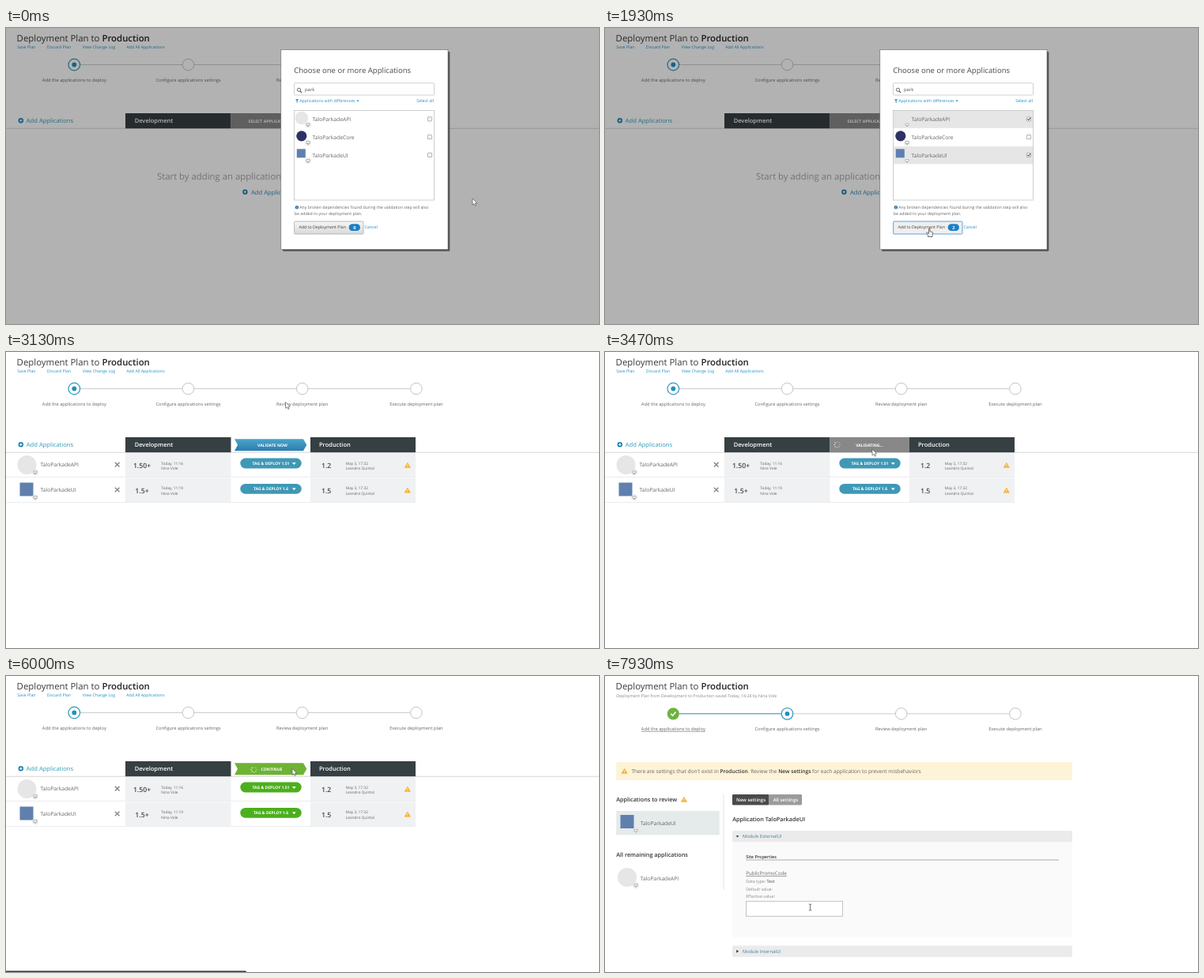
These frames come from a looping animation (750x375 px, 8000 ms). An HTML page:

```html
<!DOCTYPE html>
<html lang="en">
<head>
<meta charset="utf-8">
<title>Deployment plan</title>
<style>
  html, body { margin: 0; width: 100%; height: 100%; overflow: hidden; background: #fff; }
  svg { display: block; width: 100%; height: 100%; }
  text { font-family: "Open Sans", sans-serif; text-rendering: geometricPrecision; white-space: pre; }
</style>
</head>
<body>
<svg id="stage" viewBox="0 0 750 375"></svg>
<script>
const LOOP = 8000, FPS = 15;
const APP = 'TaloParkade';
const USER = 'Nina Vole', OTHER = 'Leandro Quintal';
const LINK = '#2390c8', TEAL = '#2f9ab8', GREY = '#666', DARK = '#363f42';

// drawing helpers
const text = (x, y, size, str, fill = GREY, weight = 400, anchor = 'start', extra = '') =>
  `<text x="${x}" y="${y}" font-size="${size}" fill="${fill}" font-weight="${weight}" text-anchor="${anchor}" ${extra}>${str}</text>`;
const rect = (x, y, w, h, fill, extra = '') =>
  `<rect x="${x}" y="${y}" width="${w}" height="${h}" fill="${fill}" ${extra}/>`;
const disc = (x, y, r, fill, extra = '') =>
  `<circle cx="${x}" cy="${y}" r="${r}" fill="${fill}" ${extra}/>`;
const path = (d, fill, extra = '') => `<path d="${d}" fill="${fill}" ${extra}/>`;
const stroke = (d, color, width = 1, extra = '') =>
  path(d, 'none', `stroke="${color}" stroke-width="${width}" ${extra}`);
const group = (id, body, extra = '') => `<g id="${id}" ${extra}>${body}</g>`;

const plus = (x, y) => disc(x, y, 3.2, '#1a7fb5') +
  stroke(`M${x - 1.8} ${y}h3.6M${x} ${y - 1.8}v3.6`, '#fff', 1.1);
const warning = (x, y) =>
  path(`M${x} ${y - 3.2}L${x + 3.6} ${y + 3}H${x - 3.6}Z`, '#f6b230', 'stroke="#f6b230" stroke-width=".6" stroke-linejoin="round"') +
  stroke(`M${x} ${y - 1.2}v2.2M${x} ${y + 1.5}v.8`, '#fff', .8);
const screenBadge = (x, y) => disc(x, y, 3.6, '#fff', 'stroke="#ccc" stroke-width=".5"') +
  stroke(`M${x - 2} ${y - 1.6}h4v2.7h-4zM${x - 1} ${y + 2}h2`, '#777', .6);
const caret = (x, y, fill, s = 2.2) => path(`M${x - s} ${y - s / 2}h${2 * s}l${-s} ${s * 1.2}z`, fill);
const apiIcon = (x, y, r) => disc(x, y, r, '#e6e6e6');
const uiIcon = (x, y, s) => rect(x - s / 2, y - s / 2, s, s, '#5f7fae');

const STEPS = ['Add the applications to deploy', 'Configure applications settings',
  'Review deployment plan', 'Execute deployment plan'];
const stepX = i => 86.3 + i * 144.2;

function stepper(y, active) {
  let out = stroke(`M86 ${y}H519`, '#c4c8ca', .9);
  if (active) out += stroke(`M86 ${y}H230`, TEAL, .9);
  STEPS.forEach((label, i) => {
    const x = stepX(i);
    if (i < active) {
      out += disc(x, y, 7.6, '#6db33f') + stroke(`M${x - 3} ${y}l2.2 2.4 4-4.6`, '#fff', 1.6);
    } else {
      const on = i === active;
      out += disc(x, y, 7.3, '#fff', `stroke="${on ? TEAL : '#bfc4c6'}" stroke-width="${on ? 1.2 : 1}"`);
      if (on) out += disc(x, y, 2.9, '#1f8fbf');
    }
    out += text(x, y + 21.1, 5.74, label, GREY, 400, 'middle',
      i < active ? 'text-decoration="underline"' : '');
  });
  return out;
}

const title = text(13.6, 16.8, 11.4,
  'Deployment Plan to <tspan font-weight="600" fill="#222">Production</tspan>', '#3a3a3a');

function planPage() {
  const links = [[14.2, 'Save Plan'], [51.8, 'Discard Plan'], [96.8, 'View Change Log'], [152.3, 'Add All Applications']];
  return title + links.map(([x, s]) => text(x, 25.5, 5.25, s, LINK)).join('') +
    stepper(46.5, 0) + plus(18.8, 117.2) + text(25.8, 120, 7.6, 'Add Applications', TEAL) +
    rect(0, 126.8, 750, .8, '#ccc') + rect(151, 108, 133.5, 19.2, DARK) +
    text(162.7, 119.8, 7.5, 'Development', '#fff', 600);
}

const emptyPlan = () =>
  rect(284.5, 108, 100.5, 19.2, '#888') +
  text(306.6, 120, 5.15, 'SELECT APPLICATIONS', '#fff', 700) +
  text(191, 192, 11.35, 'Start by adding an application to your plan', '#a3a3a3') +
  plus(302.4, 207.8) + text(310, 210.6, 7.65, 'Add Applications', '#2b86ad');

function planRow(y, icon, name, from, at, to) {
  return rect(151, y - 15, 133.5, 30.5, '#f0f1f2') + rect(385, y - 15, 133, 30.5, '#f0f1f2') +
    rect(0, y + 15.5, 518, .6, '#dfe1e2') + icon + screenBadge(37, y + 9.7) +
    text(43.6, y + 2.2, 6.7, name) +
    stroke(`M137.9 ${y - 2.9}l5.6 5.6m0-5.6l-5.6 5.6`, '#8f8f8f', 1.6) +
    text(172, y + 4.2, 8.7, from, '#414b50', 600, 'middle') +
    text(196.3, y - .3, 4.8, 'Today, ' + at) + text(196.3, y + 5.9, 4.8, USER) +
    text(399, y + 4.2, 8.7, to, '#414b50', 600) +
    text(429.8, y - .3, 4.8, 'May 3, 17:32') + text(429.8, y + 5.9, 4.8, OTHER) +
    warning(507.8, y + .6);
}

const pill = (y, label) => rect(296.3, y - 6.4, 77.4, 12.8, 'currentColor', 'rx="6.4"') +
  text(335, y + 1.9, 5.05, label, '#fff', 700, 'middle') + caret(364.3, y + .2, '#fff', 2.4);

const CHEVRON = 'M289 110.3H376L380.3 117.8 376 125.3H289L293 117.8Z';
const spinner = (x, y, r) => {
  let out = '';
  for (let i = 0; i < 8; i++)
    out += `<rect x="${-.6}" y="${-r}" width="1.2" height="1.5" rx=".4" fill="#fff" opacity="${.3 + i * .1}" transform="rotate(${i * 45})"/>`;
  return `<g transform="translate(${x} ${y})"><g class="spin">${out}</g></g>`;
};

function filledPlan() {
  return rect(385, 108, 133, 19.2, DARK) + text(396, 119.8, 7.5, 'Production', '#fff', 600) +
    planRow(142.8, apiIcon(26.5, 143, 12), APP + 'API', '1.50+', '11:16', '1.2') +
    planRow(174.6, uiIcon(26, 174, 17), APP + 'UI', '1.5+', '11:19', '1.5') +
    group('pills', pill(141, 'TAG &amp; DEPLOY 1.51') + pill(173.3, 'TAG &amp; DEPLOY 1.6')) +
    group('validate', path(CHEVRON, 'url(#blue)') + text(337, 120, 5.05, 'VALIDATE NOW', '#fff', 700, 'middle')) +
    group('validating', rect(284.5, 108, 100.5, 19.2, '#888') + spinner(293.6, 117.5, 4.2) +
      text(317.2, 120, 5.05, 'VALIDATING...', '#fff', 700)) +
    group('continue', path(CHEVRON, '#74ba3c', 'id="goShape"') +
      text(336, 120, 5.1, 'CONTINUE', '#fff', 700, 'middle') + group('goSpin', spinner(313.5, 118.7, 4)));
}

const checkbox = (y, id) => rect(533.4, y - 2.7, 5.2, 5.2, '#f4f4f4', 'rx=".6" stroke="#999" stroke-width=".7"') +
  group(id, stroke(`M534.4 ${y - .2}l1.3 1.4 2.4-3`, '#222', 1));

function dialog() {
  const row = (y, icon, name, id) => rect(365, y - 11, 176, 22.4, '#e6e6e6', `id="${id}Row"`) + icon +
    screenBadge(382, y + 7.2) + text(387.6, y + 2.9, 6.72, name) + checkbox(y, id + 'Check');
  return rect(0, 0, 750, 375, '#000', 'opacity=".3"') +
    rect(350, 30, 211.3, 252.8, '#333', 'opacity=".75" rx="1"') + rect(347.8, 27.5, 211.2, 253, '#fff', 'stroke="#666" stroke-width=".6"') +
    text(364.2, 57.3, 9.55, 'Choose one or more Applications', '#4a4a4a') +
    rect(364.5, 69.8, 177, 15.2, '#fff', 'rx="1" stroke="#c6c6c6" stroke-width=".8"') +
    disc(370.5, 78.3, 2.1, 'none', 'stroke="#555" stroke-width=".9"') + stroke('M372 79.9l2.2 2.2', '#555', 1.2) +
    text(378, 80.3, 5.9, 'park', '#555') +
    path('M366 90.2h4.2l-1.6 2v2.8l-1-.8v-2z', LINK) + text(371.3, 94.2, 5.25, 'Applications with differences', LINK) +
    caret(445, 92.3, LINK, 1.7) + text(541, 94.2, 5.35, 'Select all', LINK, 400, 'end') +
    row(115.4, apiIcon(373.8, 114, 8.2), APP + 'API', 'api') +
    row(138.2, disc(373.8, 136.8, 6.6, '#2d3263'), APP + 'Core', 'core') +
    row(161, uiIcon(373.3, 158.8, 11), APP + 'UI', 'ui') +
    rect(364.5, 104.5, 177, 113.5, 'none', 'stroke="#c2c2c2" stroke-width=".8"') +
    disc(367.9, 227.3, 2.2, '#2b6f9e') + stroke('M367.9 225.8v.7M367.9 227.1v1.6', '#fff', .8) +
    text(371.3, 229.2, 5.23, 'Any broken dependencies found during the validation step will also') +
    text(364.8, 237.4, 5.23, 'be added to your deployment plan.') +
    rect(364.6, 245, 87.4, 16, 'url(#button)', 'id="addButton" rx="1.2" stroke="#aaa" stroke-width=".8"') +
    text(370.4, 254.4, 5.28, 'Add to Deployment Plan', '#444') +
    rect(433.7, 248.3, 14.2, 8.8, '#1a80c4', 'rx="4.2"') +
    text(440.8, 254.7, 5.6, '0', '#fff', 700, 'middle', 'id="count"') +
    text(453.4, 254.4, 5.35, 'Cancel', LINK);
}

function settingsPage() {
  const bold = s => `<tspan font-weight="600" fill="#333">${s}</tspan>`;
  return title +
    text(14.2, 27.2, 5.25, `Deployment Plan from Development to Production saved Today, 14:28 by ${USER}`, '#888') +
    stepper(47.8, 1) +
    rect(14.2, 109, 576.8, 23, '#fdf3d7') + warning(24.6, 120.5) +
    text(33.4, 122.8, 6.63, `There are settings that don't exist in ${bold('Production')}. Review the ${bold('New settings')} for each application to prevent misbehaviors`) +
    text(14.2, 159, 7.25, 'Applications to review', '#333', 600) + warning(100, 156.4) +
    rect(14.2, 171, 130.6, 30.4, '#e5eaeb') + uiIcon(28, 184.5, 17) + screenBadge(39, 196) + text(44.8, 188.8, 6.7, APP + 'UI') +
    text(14.2, 228.6, 7.25, 'All remaining applications', '#333', 600) +
    apiIcon(28, 255, 12) + screenBadge(39, 265.2) + text(44.8, 258.6, 6.7, APP + 'API') +
    rect(149.6, 150, .8, 121, '#ddd') +
    rect(161, 150, 46.5, 13.5, '#4a4a4a', 'rx="1.2"') + rect(207.5, 150, 41.5, 13.5, '#9b9b9b', 'rx="1.2"') +
    text(184.6, 158.8, 5.95, 'New settings', '#fff', 600, 'middle') + text(228.4, 158.8, 5.95, 'All settings', '#fff', 600, 'middle') +
    text(161.2, 184, 7.25, `Application ${APP}UI`, '#333', 600) +
    rect(161, 203, 430, 128, '#fafafa') + rect(161, 196, 430, 14.3, '#ebebeb', 'rx="2"') +
    caret(167.5, 203.2, '#333', 2) + text(174, 205.3, 5.72, 'Module ExternalUI', '#417f9c') +
    text(178.2, 231, 5.48, 'Site Properties', '#333', 600) + rect(178.2, 232.6, 396, .8, '#999') +
    text(178.2, 252.2, 6.18, 'PublicPromoCode', GREY, 400, 'start', 'text-decoration="underline"') +
    ['Data type: <tspan fill="#444">Text</tspan>', 'Default value:', 'Effective value:']
      .map((s, i) => text(178.2, 262 + i * 9.6, 5.28, s, '#888')).join('') +
    rect(178.4, 285.3, 122, 19, '#fff', 'stroke="#b5b5b5" stroke-width=".8"') +
    rect(161, 341.6, 430, 14.3, '#ebebeb', 'rx="2"') + path('M166.2 346.9l3 1.9-3 1.9z', '#333') +
    text(174, 350.9, 5.72, 'Module InternalUI', '#417f9c');
}

const cursors =
  group('arrow', path('M0 0V8L1.9 6.4 3.2 9.2 4.5 8.6 3.3 5.9H5.8Z', '#fff', 'stroke="#444" stroke-width=".6"')) +
  group('hand', path('M0 .8C0-.2 1.5-.2 1.5.8V4.4L4.4 5Q5.2 5.2 5.1 6.2L4.5 9V11H-.8V9.4L-2.7 6.3C-3 5.4-2 5-1.4 5.8L0 7.2Z', '#fff', 'stroke="#333" stroke-width=".7"')) +
  group('beam', stroke('M-1.7-4Q0-4 0-3Q0-4 1.7-4M0-3V3M-1.7 4Q0 4 0 3Q0 4 1.7 4', '#555', .8));

const stage = document.getElementById('stage');
stage.innerHTML = `<defs>
  <linearGradient id="blue" x2="0" y2="1"><stop stop-color="#4aa5c9"/><stop offset="1" stop-color="#2b7cae"/></linearGradient>
  <linearGradient id="button" x2="0" y2="1"><stop stop-color="#f6f6f6"/><stop offset="1" stop-color="#dadada"/></linearGradient>
  </defs>` +
  group('plan', planPage()) + group('empty', emptyPlan()) + group('filled', filledPlan()) +
  group('dialog', dialog()) + group('settings', settingsPage()) +
  path('M0 375V373.6H302.5Q304 373.6 304 375Z', '#3a3a3a', 'id="bar"') + group('cursor', cursors);

const el = {};
stage.querySelectorAll('[id]').forEach(n => el[n.id] = n);
const spins = stage.querySelectorAll('.spin');
const show = (id, on) => el[id].style.display = on ? '' : 'none';

// pointer stops: time, x, y
const ROUTE = [
  [0, 590, 216], [130, 513, 151], [200, 513, 151], [530, 534, 115], [800, 534, 115],
  [1070, 534, 160], [1330, 534, 160], [1870, 409.5, 253.5], [2670, 409.5, 253.5],
  [3070, 356, 54], [3330, 338, 123], [4000, 338, 123], [4330, 362, 117.3],
  [7400, 362, 117.3], [7860, 259.5, 293], [LOOP, 259.5, 293]
];
const SPINS = [3600, 3670, 5270, 5400, 5600, 5730, 5870, 6000, 6200, 6330, 6470, 6600];

function pointer(t) {
  const i = ROUTE.findIndex(p => p[0] > t);
  const [t0, x0, y0] = ROUTE[i - 1], [t1, x1, y1] = ROUTE[i];
  const u = (t - t0) / (t1 - t0), k = u * u * (3 - 2 * u);
  return [x0 + (x1 - x0) * k, y0 + (y1 - y0) * k];
}

function render(now) {
  const tick = Math.floor((now % LOOP + 4) * FPS / 1000) % (LOOP * FPS / 1000);
  const t = Math.round(tick * 100 / FPS) * 10;
  const within = (a, b) => t >= a && t < b;

  const api = t >= 670, ui = t >= 1200, overButton = within(1800, 2470);
  show('plan', t < 7200);
  show('empty', t < 2470);
  show('dialog', t < 2470);
  show('filled', within(2470, 7200));
  show('settings', t >= 7330);
  show('bar', within(2470, 2870) || within(5670, 7400));

  show('apiRow', api); show('apiCheck', api);
  show('uiRow', ui); show('uiCheck', ui);
  show('coreRow', false); show('coreCheck', false);
  el.count.textContent = api + ui;
  el.addButton.setAttribute('fill', overButton ? '#efefef' : 'url(#button)');
  el.addButton.setAttribute('stroke', overButton ? '#3b8fd0' : '#aaa');

  show('validate', t < 3400);
  show('validating', within(3400, 3870));
  show('continue', t >= 3870);
  show('goSpin', t >= 5000);
  el.goShape.setAttribute('fill', within(4870, 5000) ? '#5f9f2c' : t >= 4470 ? '#6db235' : '#74ba3c');
  el.pills.style.color = t < 3870 ? '#3f98b6' : '#4caf1d';
  const turn = SPINS.filter(s => s <= t).length * 45;
  spins.forEach(s => s.setAttribute('transform', `rotate(${turn})`));

  const [x, y] = pointer(t);
  const beam = t > 7400 && y > 285 && x < 300;
  show('hand', overButton);
  show('beam', beam);
  show('arrow', !overButton && !beam);
  el.cursor.setAttribute('transform', `translate(${x.toFixed(2)} ${y.toFixed(2)})`);
}

const start = performance.now();
(function loop() {
  render(performance.now() - start);
  requestAnimationFrame(loop);
})();
</script>
</body>
</html>
```
